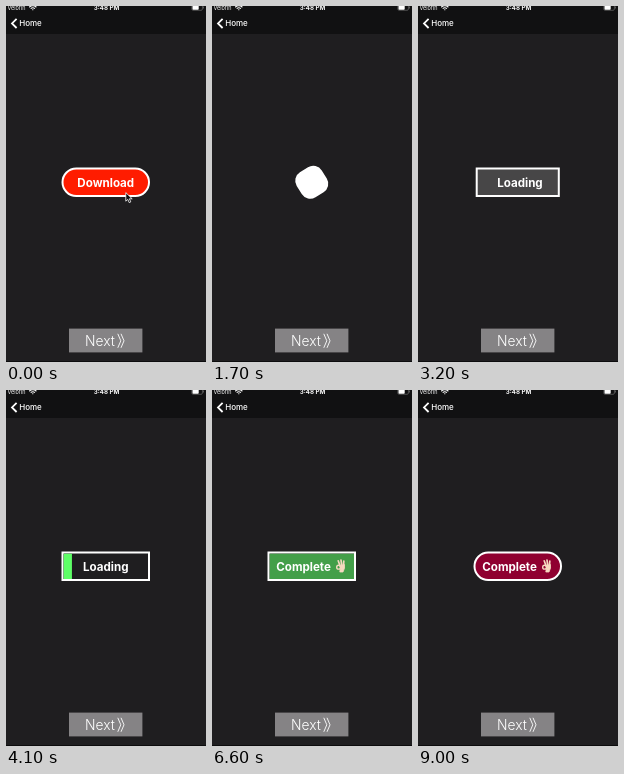
These frames come from a looping animation (200x356 px, 9100 ms). An HTML page:

```html
<!DOCTYPE html>
<html lang="en">
<head>
<meta charset="utf-8">
<title>Download button</title>
<style>
  html, body { margin: 0; width: 100%; height: 100%; overflow: hidden; background: #1f1e20; }
  svg { display: block; width: 100vw; height: 100vh; }
  text { font-family: Inter, "Liberation Sans", sans-serif; fill: #fff; }
  .label { font-size: 11.6px; font-weight: 700; text-anchor: middle; }
</style>
</head>
<body>
<svg viewBox="0 0 200 356">
  <defs>
    <clipPath id="clip"><rect id="clipBox"/></clipPath>
  </defs>
  <rect width="200" height="356" fill="#1f1e20"/>
  <rect width="200" height="28" fill="#111112"/>
  <rect y="355" width="200" height="1" fill="#0c0c0d"/>

  <!-- status bar -->
  <text x="1.5" y="4" font-size="5.5">Velorin</text>
  <g fill="none" stroke="#fff" stroke-width="1.1">
    <path d="M23.2 1.2Q26.8 -1.6 30.4 1.2M24.7 2.6Q26.8 1 28.9 2.6"/>
    <path d="M26.8 3.2v1"/>
  </g>
  <text x="100.5" y="4.2" font-size="6.2" font-weight="700" text-anchor="middle">3:48 PM</text>
  <rect x="185.8" y="-1.5" width="10.6" height="5.8" rx="1.3" fill="none" stroke="#777" stroke-width=".6"/>
  <rect x="186.5" y="-1" width="6.2" height="4.8" rx=".8" fill="#fff"/>
  <path d="M197.4 .5v2" stroke="#777" stroke-width=".8"/>

  <!-- navigation -->
  <path d="M10.6 12.8L6 17.4L10.6 22" fill="none" stroke="#fff" stroke-width="1.8"/>
  <text x="13.2" y="20.2" font-size="8" font-weight="500">Home</text>
  <rect x="63" y="322.6" width="73.4" height="23.8" fill="#858385"/>
  <text x="79" y="339.8" font-size="13.8" font-weight="300">Next</text>
  <path d="M111.8 327.8L114.8 334.8L111.8 341.8M115 327.8L118 334.8L115 341.8"
        fill="none" stroke="#fff" stroke-width=".9"/>

  <!-- button -->
  <g id="button">
    <rect id="box" stroke="#fff" stroke-width="2"/>
    <g clip-path="url(#clip)">
      <rect id="bar" x="57.5" y="163.5" height="25.5" fill="#5eff67"/>
      <g id="labels">
        <text id="download" class="label" x="99.75" y="180.6">Download</text>
        <text id="loading" class="label" x="99.75" y="180.6">Loading</text>
        <g id="complete">
          <text class="label" x="91.6" y="180.6">Complete</text>
          <g stroke-linecap="round" fill="none" stroke="#f6d9c0" stroke-width="1.7">
            <path d="M128.2 176.2L126.2 170.8M129.8 175.8L129 170M131.4 176L131.8 171.2"/>
            <circle cx="126.6" cy="177.2" r="1.9" stroke-width="1.4"/>
            <path d="M129 175.8L132.4 174.4Q133.4 178 131 182H127.8L128.2 179Z" fill="#f6d9c0" stroke-width=".8"/>
          </g>
        </g>
      </g>
    </g>
  </g>
  <path id="cursor" d="M119.8 186.6V195.2L121.8 193.4L123.2 196.6L124.8 195.9L123.4 192.8H126.2Z"
        fill="#111" stroke="#fff" stroke-width=".8"/>
</svg>
<script>
  const LOOP = 9100, STEP = 100;
  const CX = 99.75, CY = 176.25, WIDE = 88.5, HIGH = 29.5, ROUND = HIGH / 2;
  const RED = [255, 28, 0], WHITE = [255, 255, 255], DARK = [31, 30, 32], WINE = [143, 0, 48];

  const el = id => document.getElementById(id);
  const set = (id, attrs) => {
    for (const key in attrs) el(id).setAttribute(key, attrs[key]);
  };
  const show = (id, on) => set(id, { visibility: on ? 'visible' : 'hidden' });
  const part = (t, start, length) => Math.min(1, Math.max(0, (t - start) / length));
  const ease = p => (1 - Math.cos(Math.PI * p)) / 2;
  const lerp = (a, b, p) => a + (b - a) * p;
  const mix = (a, b, p) => `rgb(${a.map((v, i) => Math.round(lerp(v, b[i], p)))})`;
  const frame = (w, inset, r) => ({
    x: CX - w / 2 + inset, y: CY - HIGH / 2 + inset,
    width: w - 2 * inset, height: HIGH - 2 * inset, rx: Math.max(0, r - inset)
  });

  function draw(t) {
    const shrink = ease(part(t, 200, 930));
    const spin = ease(part(t, 1200, 1300));
    const grow = ease(part(t, 2500, 850));
    const fade = part(t, 2500, 850);
    const load = ease(part(t, 3560, 2640));
    const finish = ease(part(t, 6450, 2250));

    const width = lerp(WIDE, HIGH, shrink - grow);
    const radius = ROUND * (1 - spin + finish);
    const fill = t < 2500 ? mix(RED, WHITE, shrink)
      : t < 6400 ? mix(WHITE, DARK, fade)
      : mix(DARK, WINE, finish);

    set('box', { ...frame(width, 1, radius), fill });
    set('clipBox', frame(width, 2, radius));
    set('button', { transform: `rotate(${180 * (spin % 1)} ${CX} ${CY})` });
    set('labels', { transform: `translate(${(WIDE - width) / 2} 0)` });
    set('bar', { width: 84.5 * load, opacity: 1 - part(t, 6300, 700) });

    show('cursor', t < 200);
    show('download', t < 1200);
    show('loading', t >= 2500 && t < 6400);
    show('complete', t >= 6400);
  }

  const begin = performance.now();
  function tick() {
    const t = (performance.now() - begin) % LOOP;
    draw(Math.floor(t / STEP) * STEP);
    requestAnimationFrame(tick);
  }
  tick();
</script>
</body>
</html>
```
